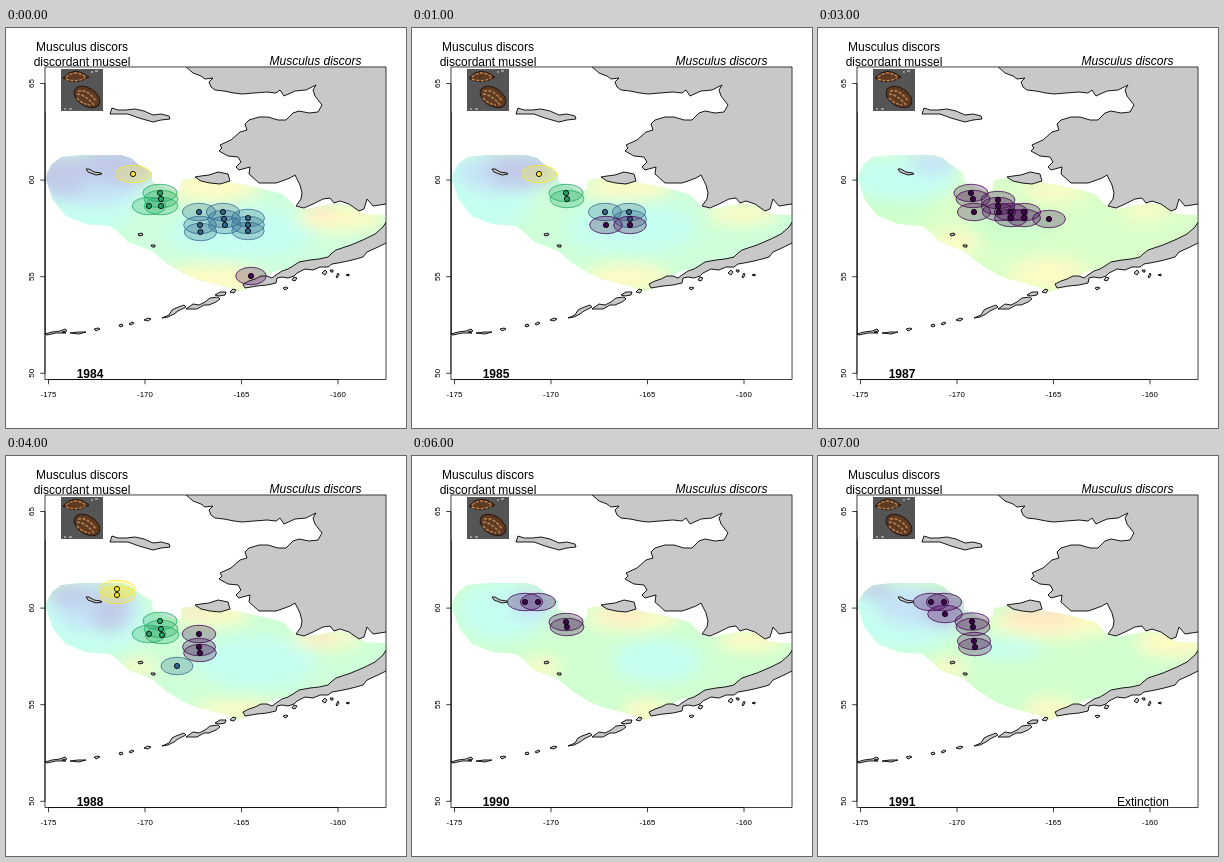
An HTML page for the animation above (8 s loop, 400 px wide and 400 px high).

```html
<!DOCTYPE html>
<html lang="en">
<head>
<meta charset="utf-8">
<title>Survey map</title>
<style>
html, body { margin: 0; width: 100%; height: 100%; overflow: hidden; background: #fff; }
svg { display: block; width: 100vw; height: 100vh; }
text { font: 12px "Liberation Sans", Arial, sans-serif; text-anchor: middle; }
#axes text { font-size: 7.92px; }
#land path { fill: #c8c8c8; stroke: #000; stroke-width: .9; stroke-linejoin: round; }
</style>
</head>
<body>
<svg viewBox="0 0 400 400">
  <defs>
    <clipPath id="frame"><rect x="39" y="39" width="341" height="312.5"/></clipPath>
    <clipPath id="shelf"><path d="M40 152L41 145 46 136 55 129 75 127H115L125 130 133 137 146 145V153L155 158 167 163 174 163 176 152 190 150 215 153 240 157 262 162 277 166 290 179 300 181 330 175 350 178 358 186 379 187V202L340 222 300 237 270 243 250 253 240 261 232 264 220 259 190 251 178 246 160 235 146 223 122 214 112 204 104 198 80 196 60 188 47 172Z"/></clipPath>
    <filter id="soft" x="-20%" y="-20%" width="140%" height="140%" color-interpolation-filters="sRGB"><feGaussianBlur stdDeviation="8"/></filter>
  </defs>

  <g id="heat" clip-path="url(#shelf)"></g>

  <g id="land" clip-path="url(#frame)">
    <path d="M178 37L187 45 195 48 199 51 207 50 203 54 205 59 209 62 218 63 228 65 236 66 248 65 261 64 270 65 274 62 278 68 289 63 300 62 310 57 307 62 309 68 316 77 312 84 303 85 293 83 287 85 280 92 272 92 262 89 253 89 243 92 239 96 241 102 234 104 225 112 214 117 216 120 213 123 222 128 232 129 235 134 230 139 233 142 244 139 243 146 253 155 270 155 276 153 284 150 289 147 294 157 296 165 295 171 290 178 298 180 307 176 317 171 324 170 328 175 334 173 343 176 353 183 358 181 361 171 367 178 380 176 384 170V37Z"/>
    <path d="M384 188L377 199 369 206 359 211 345 217 330 222 325 226 322 229 313 231 304 232 293 234 287 238 282 241 276 243 270 247 266 250 261 248 255 248 249 251 243 253 237 256 239 260 251 258 261 257 270 255 271 250 276 249 282 250 288 248 291 245 299 241 307 242 314 239 322 239 326 236 332 235 342 233 350 231 357 229 361 224 372 219 384 213Z"/>
    <path d="M104 86L106 80 112 82 120 82 129 81 138 83 147 87 155 86 163 88 164 91 155 92 147 94 140 92 133 90 122 86 112 86Z"/>
    <path d="M189 149L195 148 203 147 212 144 222 146 224 153 214 156 204 155 195 153Z"/>
    <path d="M80 141L83 141 88 144 95 145 96 146 90 147 82 144Z"/>
    <path d="M132 206l4-1 1 2-4 1ZM145 217l4 0 0 2-3 0Z"/>
    <path d="M180 281L187 276 193 277 199 274 204 270 212 269 214 271 210 274 203 277 198 277 191 281ZM209 267L214 264 220 264 219 267 213 268ZM224 264l3-3 3 1-2 3Z"/>
    <path d="M156 290L163 287 166 282 170 280 178 277 180 279 172 283 168 286 162 289ZM138 292l4-2 3 1-3 2ZM123 296l3-2 2 1-3 2ZM113 297l3-1 1 2-3 1ZM88 301l4-1 2 1-4 2ZM64 305l8-1 8 0-7 2ZM39 306l7-2 8-1 5-2 2 2-5 1 4 1-10 0-9 2Z"/>
    <path d="M277 260l3-1 2 1-3 2ZM286 252l2-3 3 1-2 3ZM316 245l3-3 2 2-2 3ZM324 242l3 0 0 2-2 0ZM330 249l2-4 1 2-2 3ZM340 247l3-1 0 2Z"/>
    <path d="M39 84V306"/>
  </g>

  <g id="photo">
    <path d="M55 41H97V83H55Z" fill="#555"/>
    <g fill="#5e3a22" stroke="#22160f">
      <path d="M57 50Q68 37 83 49Q69 58 57 50Z"/>
      <ellipse cx="81" cy="69" rx="14" ry="9" transform="rotate(32 81 69)"/>
    </g>
    <path d="M60 49Q69 41 80 49M60 51Q70 55 79 50M72 63Q82 61 90 73M71 66Q80 67 88 77M71 70Q76 76 84 77" fill="none" stroke="#bd8452" stroke-width="1.5" stroke-dasharray="3 1.5"/>
    <path d="M85 44h2M89 43h3M58 81h2M63 81h3" stroke="#ddd"/>
  </g>

  <g id="survey" clip-path="url(#frame)"></g>
  <path d="M38.97 38.97H380.04V351.53H38.97Z" fill="none" stroke="#000" stroke-width=".75"/>
  <g id="axes"></g>
  <text x="76" y="23">Musculus discors</text>
  <text x="76" y="38">discordant mussel</text>
  <text x="309.5" y="37" style="font-style:italic">Musculus discors</text>
  <text id="year" x="84" y="350" style="font-weight:bold"></text>
  <text id="note" x="325" y="350">Extinction</text>
</svg>
<script>
const $ = id => document.getElementById(id);
const heatColors = { b: '#c1cbe8', l: '#c5e3f7', c: '#c5fff1', g: '#ccffcc', y: '#fdfbc4', o: '#ffe5c3' };
const dotColors = { y: '#fde725', g: '#22a866', b: '#31688e', p: '#440154', k: '#000' };

// Heat spots: "colour x y rx ry"; sightings: "colour x,y x,y ..."
const survey = (base, spots, sightings) => ({ base, spots: spots.split('; '), sightings: sightings.split('; ') });

const years = [
  survey('#cfffdc',
    'c 80 170 55 35; l 85 155 50 22; b 55 147 28 22; b 112 137 42 20; c 235 205 75 25; y 205 158 50 16; y 335 190 45 14; o 315 182 14 7; y 205 252 55 16',
    'y 127,146; g 154,165 155,171 143,178 155,178; b 193,184 194,197 194.5,204 217,184 218,191 219,197 242,190 242,197 242,203; p 245,248'),
  survey('#ceffda',
    'c 70 165 50 40; l 90 145 45 20; b 110 142 35 18; c 220 200 65 25; y 215 159 45 13; y 330 186 35 11; y 215 250 45 15',
    'y 127,146; g 154,165 155,171; b 193,184 217,184 218,191; p 194,197 218,197'),
  survey('#ceffd0',
    'c 75 155 60 34; l 90 148 50 22; b 95 134 30 14; b 126 147 24 22; c 195 192 55 24; y 235 163 30 9; y 228 246 22 11',
    'y 155,172; p 193,184 217.5,178 218,184 218,191'),
  survey('#dbffca',
    'g 75 180 40 20; c 85 150 55 24; l 115 135 25 12; g 195 195 45 20; y 235 164 32 10; y 328 183 24 9; y 138 213 25 12; y 230 246 40 16',
    'p 153,165 155,171 156,184 180,172 180,178 181,184 193,184 193,190 206,184 206,190 231,191'),
  survey('#cfffd8',
    'c 85 165 60 35; l 90 150 42 25; b 64 138 25 11; b 105 156 18 20; c 250 206 60 26; y 205 158 40 12; o 193 154 16 7; y 320 183 35 10; o 315 182 16 6; y 133 211 18 9; y 230 254 45 10',
    'y 111,133 111,139; g 154,165 155,173 156,179 143,178; p 193,178 193,191 194,197; b 171,210'),
  survey('#d2ffcf',
    'c 112 145 22 22; c 250 210 34 26; y 205 160 52 15; o 187 158 24 9; y 322 184 26 10; y 130 211 20 10; y 232 256 24 10',
    'k 110,133.5'),
  survey('#d0ffd2',
    'c 90 155 45 30; l 120 148 22 16; c 245 205 45 22; y 220 161 48 14; o 212 158 22 7; y 340 184 34 12; y 130 211 20 10; y 234 255 25 12',
    'p 113,146 126,146 154,166 155,171'),
  survey('#d1ffd0',
    'c 85 162 58 34; l 95 150 36 20; b 56 133 18 9; b 125 154 22 18; c 190 192 36 10; y 235 166 62 17; o 222 160 38 11; y 355 186 38 16; y 130 213 20 10; y 232 254 27 13',
    'p 113,146 126,146 127,158 154,165.5 155,171 156,185 157,191')
];

const heatMarkup = ({ base, spots }) => `<rect width="400" height="400" fill="${base}"/><g filter="url(#soft)">` +
  spots.map(spot => {
    const [color, x, y, rx, ry] = spot.split(' ');
    return `<ellipse cx="${x}" cy="${y}" rx="${rx}" ry="${ry}" fill="${heatColors[color]}"/>`;
  }).join('') + '</g>';

// A circle of fixed distance widens towards the pole
const radius = 8.75;
const widthAt = y => radius / Math.cos((65 - (y - 55.5) / 19.32) * Math.PI / 180);

const sightingMarkup = ({ sightings }) => sightings.map(group => {
  const [key, ...points] = group.split(' ');
  const color = dotColors[key];
  const each = draw => points.map(p => draw(...p.split(','))).join('');
  return each((x, y) => `<ellipse cx="${x}" cy="${y}" rx="${widthAt(y)}" ry="${radius}" fill="${color}" fill-opacity=".27" stroke="${color}" stroke-opacity=".85" stroke-width=".9"/>`) +
    each((x, y) => `<circle cx="${x}" cy="${y}" r="2.6" fill="${color}" stroke="#000" stroke-width=".9"/>`);
}).join('');

const addLayers = (parent, markup) => {
  parent.innerHTML = years.map(year => `<g>${markup(year)}</g>`).join('');
  return [...parent.children];
};
const layers = [addLayers($('heat'), heatMarkup), addLayers($('survey'), sightingMarkup)];

let axes = 'M38.97 55.5V345.3M42.5 351.53H332';
let labels = '';
for (let i = 0; i < 4; i++) {
  const x = 42.5 + i * 96.5, y = 55.5 + i * 96.6;
  axes += `M${x} 351.53v4.75M38.97 ${y}h-4.75`;
  labels += `<text x="${x}" y="368.6">${-175 + i * 5}</text>` +
    `<text transform="translate(27.5 ${y}) rotate(-90)">${65 - i * 5}</text>`;
}
$('axes').innerHTML = `<path d="${axes}" stroke="#000" stroke-width=".75"/>` + labels;

let shown = -1;
function render() {
  const index = Math.floor(performance.now() / 1000) % years.length;
  if (index !== shown) {
    shown = index;
    for (const layer of layers) layer.forEach((g, i) => g.style.display = i === index ? '' : 'none');
    $('year').textContent = 1984 + index;
    $('note').style.display = index === years.length - 1 ? '' : 'none';
  }
  requestAnimationFrame(render);
}
render();
</script>
</body>
</html>
```
